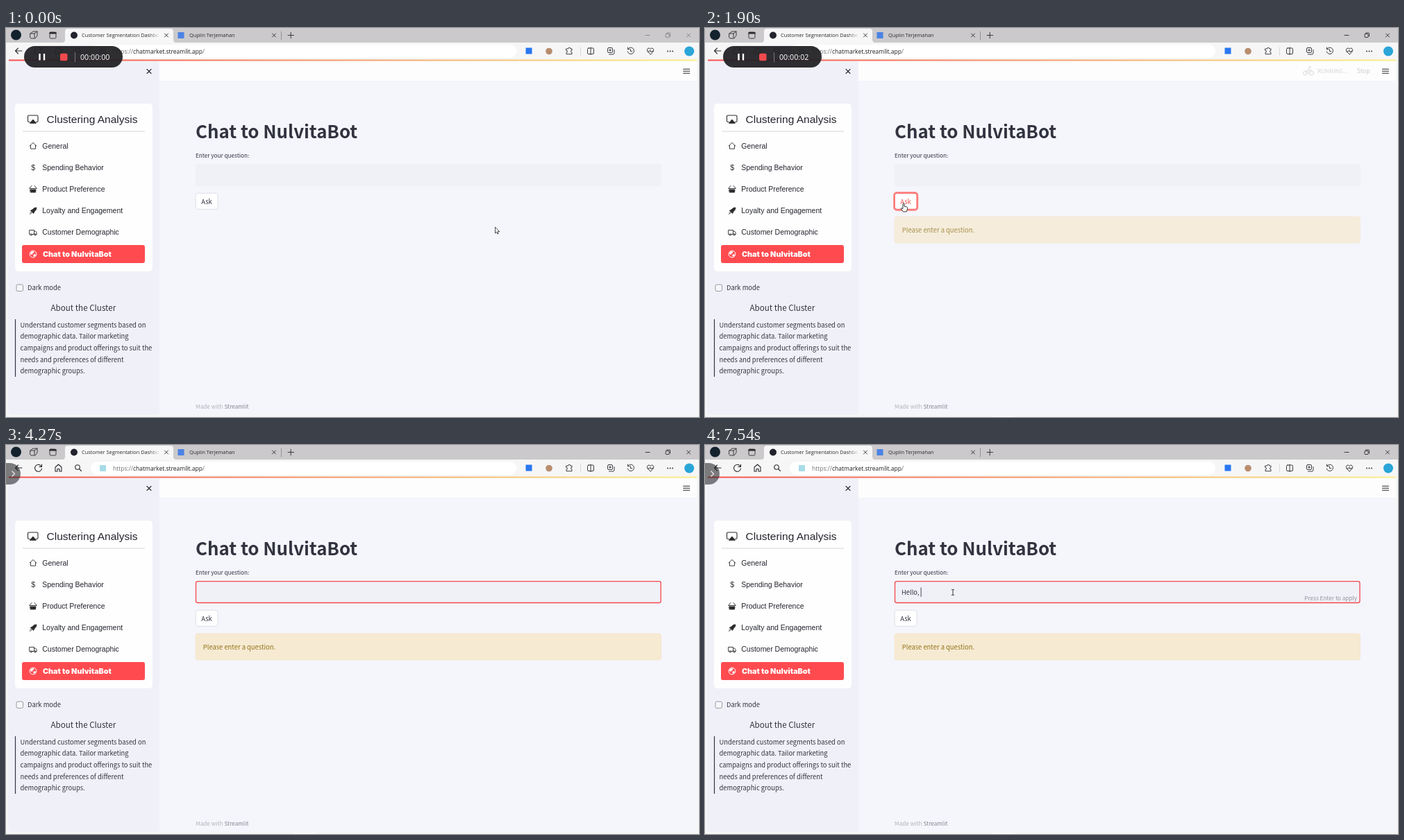
An HTML page for the animation above (8000 ms loop, 998 px wide and 561 px high).

```html
<!DOCTYPE html>
<html lang="en">
<head>
<meta charset="utf-8">
<title>Customer Segmentation Dashboard</title>
<style>
  html, body { margin: 0; width: 100%; height: 100%; overflow: hidden; background: #f3f3f5; }
  svg { display: block; width: 100vw; height: 100vh; }
  text { white-space: pre; }
  .src { font-family: "Noto Sans CJK JP", "Noto Sans CJK SC", "Noto Sans CJK KR", "Noto Sans CJK", sans-serif; font-size: 9.39px; fill: #31333f; }
  .sm { font-size: 8.2px; }
  .nav { font: 10.48px "Liberation Sans", Arial, sans-serif; fill: #24262e; }
  .ui { font: 7.35px "Open Sans", "Noto Sans", sans-serif; fill: #2a2a2c; }
  .line { fill: none; stroke: #2b2b2e; stroke-width: 1.1; stroke-linecap: round; stroke-linejoin: round; }
  .thin { stroke-width: .9; }
</style>
</head>
<body>
<svg viewBox="0 0 998 561" preserveAspectRatio="none">
  <defs>
    <linearGradient id="bar"><stop stop-color="#f5504f"/><stop offset="1" stop-color="#fbf28a"/></linearGradient>
    <linearGradient id="fade" gradientUnits="userSpaceOnUse" x1="206" x2="222" y1="0" y2="0">
      <stop stop-color="#f8f7f8" stop-opacity="0"/><stop offset="1" stop-color="#f8f7f8"/>
    </linearGradient>
  </defs>

  <!-- browser tabs -->
  <rect width="998" height="561" fill="#f6f6f7"/>
  <rect width="998" height="21" fill="#cbc9cb"/>
  <path d="M81 21q4 0 4-4V5q0-4 4-4H237q4 0 4 4V17q0 4 4 4Z" fill="#f8f7f8"/>
  <circle cx="14.500" cy="10" r="7.500" fill="#14222e"/>
  <g class="line thin">
    <path d="M35 8l4-3h6v6l-3 4h-6l-1-1ZM35 8h6v6M41 8l4-3"/>
    <rect x="63" y="6" width="9" height="9" rx="1.500"/>
    <path d="M63.500 7.200h8" stroke-width="2.400"/>
    <path d="M228.500 8l5 5m0-5l-5 5M383.500 8l5 5m0-5l-5 5M406 10.500h8.500M410.200 6.200v8.500"/>
    <path d="M396.500 5v12" stroke="#8f8d90"/>
  </g>
  <circle cx="98" cy="10.500" r="5" fill="#22232c"/>
  <rect x="247.500" y="6" width="9" height="9" fill="#4b83e6"/>
  <text class="ui" x="109" y="13">Customer Segmentation Dashbo</text>
  <rect x="206" y="3" width="16" height="15" fill="url(#fade)"/>
  <text class="ui" x="264" y="13">Quplin Terjemahan</text>
  <g id="winButtons" class="line thin">
    <path d="M921 10.500h6M980.500 8l5 5m0-5l-5 5"/>
    <rect x="950" y="8.500" width="5" height="5" rx="1"/><path d="M951.500 7h4q1 0 1 1v4"/>
  </g>

  <!-- toolbar -->
  <rect x="122" y="24" width="613" height="19" rx="9.500" fill="#fff"/>
  <g class="line">
    <path d="M23 33H13.500m4-4l-4 4 4 4M51 31a5 5 0 1 0 .5 3M51.500 28v3.500H48"/>
    <path d="M71 32l4.500-4 4.500 4v6h-3v-3.500h-3V38h-3Z"/>
    <circle cx="103" cy="32" r="3.300"/><path d="M105.500 34.500l3 3"/>
  </g>
  <rect x="135" y="29" width="9" height="9" rx="1" fill="#a9dbe8"/>
  <text class="ui" x="154" y="36.500" style="font-size:8.5px;fill:#737378">https://<tspan fill="#1d1d20">chatmarket.streamlit.app</tspan>/</text>
  <rect x="748.500" y="28.500" width="9" height="9" fill="#2877f0"/>
  <circle cx="782" cy="33.500" r="4.800" fill="#b98d6c"/>
  <g class="line thin">
    <path d="M807 30h2.500a1.700 1.700 0 0 1 3.400 0h2.100v2.300a1.500 1.500 0 0 0 0 3v2.400h-8v-2.400a1.500 1.500 0 0 0 0-3Z"/>
    <path d="M827.500 28v11" stroke="#d5d5d8"/>
    <rect x="837.500" y="29" width="9" height="8.500" rx="1.500"/><path d="M842 28v10.500"/>
    <rect x="866.500" y="28.500" width="7" height="7" rx="1.500"/>
    <path d="M868.500 38h5.500q2 0 2-2v-4.500M870 30.500v3M868.500 32h3"/>
    <path d="M896 30a4.700 4.700 0 1 1-.8 4M895.500 28v2.800h2.800M899.500 31v2.700h2.300"/>
    <path d="M928 38l-4-4.200q-2-3 .8-4.600 2-.7 3.200 1.300 1.200-2 3.200-1.300 2.800 1.600.8 4.600ZM924 34h2.500l1.200-2 1.500 3 1-1.500h2"/>
  </g>
  <g fill="#2b2b2e"><circle cx="953" cy="33.500" r=".9"/><circle cx="956.500" cy="33.500" r=".9"/><circle cx="960" cy="33.500" r=".9"/></g>
  <circle cx="984" cy="33.500" r="7" fill="#2aa5d8"/>

  <!-- page -->
  <path d="M3 46H995V553q0 5-5 5H8q-5 0-5-5Z" fill="#f5f5fc"/>
  <path d="M3 48H221V558H8q-5 0-5-5Z" fill="#f0f1f8"/>
  <rect x="221" y="48" width="774" height="28" fill="#fdfdfd"/>
  <rect x="4" y="45.500" width="991" height="2" fill="url(#bar)"/>
  <path class="line" d="M203 59.500l6 6m0-6l-6 6M975.500 59.200h9M975.500 62.200h9M975.500 65.200h9"/>
  <rect id="taskbar" x="415" y="559.500" width="31" height="1.500" fill="#fff"/>

  <!-- sidebar card -->
  <rect x="13" y="109" width="198" height="242" rx="5" fill="#fefefe"/>
  <g class="line"><path d="M34 135.500h-1q-1.500 0-1.500-1.500v-6.500q0-1.500 1.500-1.500h11.500q1.500 0 1.500 1.500v6.500q0 1.500-1.500 1.500h-1"/><path d="M34.500 137.300l4.400-5 4.400 5Z" fill="#2b2b2e"/></g>
  <text class="nav" x="58.500" y="137" style="font-size:15.5px">Clustering Analysis</text>
  <path d="M24 149h176" stroke="#d6d7dc"/>
  <g id="nav"></g>
  <g class="line thin">
    <path d="M34 170.200l5-4.700 5 4.700M35.500 169.500v4.700h7v-4.700"/>
    <path d="M34 231l3-3.500M44 231l-3-3.500"/><path d="M34 231.500h10M35 233h8l-.5 4h-7Z" fill="#2b2b2e"/>
    <path d="M35.500 263.500l3-2q2-3 5.500-2.500 0 3.500-2.800 5.500l-1.700 3-1.500-2-2.500-2ZM35 266.500l1.500-1.500M34.500 268.500l3-2.500" fill="#2b2b2e"/>
    <path d="M34 291.500h6.500v6h-6.500ZM40.500 293.200h2.300l1.400 2v2.300h-3.700"/>
    <circle cx="36.200" cy="298" r="1.200" fill="#fff"/><circle cx="42" cy="298" r="1.200" fill="#fff"/>
  </g>
  <rect x="23" y="313" width="177" height="26" rx="3" fill="#ff4b4f"/>
  <circle cx="39" cy="326" r="4.900" fill="none" stroke="#fff"/>
  <path d="M36 322.500l3.500-.5 1 2-2.500 1.300-.5 2-2.500-1.800ZM39 327l3-1 1 1.500-2.500 2.800Z" fill="#fff"/>
  <text x="53" y="330" style="font:900 10.8px Inter,sans-serif;fill:#fff">Chat to NulvitaBot</text>

  <rect x="15" y="370" width="9.500" height="9.500" rx="2" fill="#f7f7fa" stroke="#8e9098" stroke-width=".9"/>
  <text class="src" x="31" y="378.300">Dark mode</text>
  <text class="src" x="64.500" y="408" style="font-size:11.6px">About the Cluster</text>
  <path d="M13.500 420v83" stroke="#31333f" stroke-width="1.200"/>
  <g id="about"></g>

  <!-- main column -->
  <text class="src" x="273" y="158.800" style="font-size:25.8px;font-weight:700">Chat to NulvitaBot</text>
  <text class="src sm" x="273" y="187">Enter your question:</text>
  <rect x="273" y="196" width="671" height="32" rx="3" fill="#f0f1f7"/>
  <rect id="focus" x="273.500" y="196.700" width="669.500" height="30.800" rx="2.500" fill="none" stroke="#f4484b" stroke-width="1.300"/>
  <text id="typed" class="src" x="283" y="215.700"></text>
  <path id="caret" d="M.5 205.500v13.500" stroke="#31333f" stroke-width=".9"/>
  <text id="hint" class="src sm" x="939" y="223.800" text-anchor="end" style="fill:#94959d">Press Enter to apply</text>

  <rect id="ring" x="272.200" y="237.200" width="34" height="25.600" rx="4" fill="none" stroke="#ff8583" stroke-width="2"/>
  <rect id="ask" x="273.200" y="238.300" width="31.800" height="23" rx="3" fill="#fff"/>
  <text id="askText" class="src" x="289" y="253.600" text-anchor="middle">Ask</text>

  <g id="warning">
    <rect x="273" y="272" width="670.500" height="38" rx="3" fill="#f6ead3" stroke="#f3e6cb" stroke-width=".8"/>
    <text class="src" x="283.800" y="294.600" style="fill:#927317">Please enter a question.</text>
  </g>
  <g id="running">
    <g class="line thin" style="stroke:#77787f"><circle cx="864.500" cy="65" r="3"/><circle cx="873.500" cy="65" r="3"/><path d="M865 65l2.500-4.500 2.500 2v3.500M867.500 60.500l2-2 2 2.500h2"/><circle cx="871" cy="56.500" r="1"/></g>
    <text class="src" x="882" y="65.300" style="font-size:8.2px;fill:#77787f">RUNNING...</text>
    <text class="src" x="939" y="65.300" style="font-size:8.6px;fill:#55565e">Stop</text>
  </g>
  <text class="src sm" x="273" y="549" style="fill:#b2b2b8">Made with <tspan style="fill:#85868e;font-weight:500">Streamlit</tspan></text>

  <!-- screen recorder -->
  <g id="recorder">
    <rect id="pill" x="26" y="26" width="142" height="31" rx="15.500" fill="#242326"/>
    <g id="controls">
      <path d="M48.500 37v9.500M55 37v9.500" stroke="#fff" stroke-width="2.400"/>
      <rect x="78" y="36.800" width="10.500" height="10.500" rx="2" fill="#f0494e"/>
      <path d="M99.500 35v14" stroke="#77777b"/>
      <text id="timer" class="ui" x="107" y="46" style="font-size:10.7px;fill:#fff"></text>
    </g>
  </g>
  <path id="chevron" d="M8.500 37.500l4 4-4 4" fill="none" stroke="#ededee" stroke-width="1.200"/>

  <!-- pointers, hot spot at the origin -->
  <path id="arrow" d="M0 0V9l2-1.800L3.300 10l1.300-.6L3.400 6.700H6.200Z" fill="#fff" stroke="#222" stroke-width=".8"/>
  <path id="hand" d="M-1 1q0-1.200 1-1.200T1 1v3.200l3.600.8q1.200.3 1 1.600L5 9.500 4 12H-.5L-3.500 8q-.6-1.200.6-1.300L-1 7.600Z" fill="#fff" stroke="#222" stroke-width=".9"/>
  <path id="beam" d="M-2-4H-.6L0-3.500.6-4H2M0-3.500v7M-2 4H-.6L0 3.500.6 4H2" fill="none" stroke="#222" stroke-width=".9"/>
</svg>
<script>
const LOOP = 8000;
const $ = id => document.getElementById(id);
const set = (id, attrs) => { for (const k in attrs) $(id).setAttribute(k, attrs[k]); };
const show = (id, o) => set(id, { opacity: +o });
const ramp = (t, a, b) => Math.min(1, Math.max(0, (t - a) / (b - a)));
const ease = x => x * x * (3 - 2 * x);
const mix = (a, b, k) => a + (b - a) * k;

function addLines(id, cls, x, y, step, lines) {
  lines.forEach((line, i) => {
    const el = document.createElementNS("http://www.w3.org/2000/svg", "text");
    el.setAttribute("class", cls);
    el.setAttribute("x", x);
    el.setAttribute("y", y + i * step);
    el.textContent = line;
    $(id).append(el);
  });
}
addLines("nav", "nav", 52.3, 173.6, 31.15,
  ["General", "Spending Behavior", "Product Preference", "Loyalty and Engagement", "Customer Demographic"]);
addLines("nav", "nav", 36.2, 204.8, 0, ["$"]);
addLines("about", "src", 20.5, 431.7, 16.65, [
  "Understand customer segments based on",
  "demographic data. Tailor marketing",
  "campaigns and product offerings to suit the",
  "needs and preferences of different",
  "demographic groups."]);

// pointer moves: start, end, target x, target y
const HOME = [704.5, 287];
const MOVES = [
  [40, 840, 286, 253],
  [2240, 2920, 428.5, 204],
  [3470, 4100, 431, 580],
  [4270, 5070, 357, 212.5]
];
const KEYS = [6470, 6640, 6800, 6970, 7140, 7300, 7540];

function pointer(t) {
  let [x, y] = HOME;
  for (const [a, b, tx, ty] of MOVES) {
    const k = ease(ramp(t, a, b));
    x = mix(x, tx, k);
    y = mix(y, ty, k);
  }
  return [x, y];
}

function draw(t) {
  // pointer
  const [x, y] = pointer(t);
  const onAsk = x > 273 && x < 305 && y > 238 && y < 262;
  const inInput = x > 273 && x < 943 && y > 196 && y < 228;
  const kind = onAsk ? "hand" : inInput ? "beam" : "arrow";
  for (const id of ["arrow", "hand", "beam"]) show(id, id === kind);
  set(kind, { transform: `translate(${x} ${y})` });

  // window and button
  const active = t >= 1400;
  show("winButtons", active ? 1 : .45);
  show("taskbar", active);
  const pressed = t >= 1400 && t < 2940;
  const red = onAsk || pressed;
  set("ask", { stroke: red ? "#f4504f" : "#d9dae1", "stroke-width": red ? 1 : .8 });
  $("askText").style.fill = red ? "#f4504f" : "#31333f";
  show("ring", pressed ? ramp(t, 1400, 1550) : 0);

  // app response
  show("running", .4 * ramp(t, 1480, 1700) * (1 - ramp(t, 1850, 2040)));
  show("warning", t < 1720 ? 0 : mix(.5, 1, ramp(t, 1720, 2040)));

  // input
  const focus = ramp(t, 2930, 3150) - ramp(t, 5270, 5430) + ramp(t, 5450, 5610);
  show("focus", focus);
  const typed = "Hello, ".slice(0, KEYS.filter(k => t >= k).length);
  $("typed").textContent = typed;
  const caretOn = (t >= 2940 && t < 3470) || (t >= 5510 && t < 6040) || t >= KEYS[0];
  show("caret", caretOn);
  const w = typed ? $("typed").getComputedTextLength() : 0;
  set("caret", { transform: `translate(${283 + w} 0)` });
  show("hint", t < KEYS[0] ? 0 : mix(.35, 1, ramp(t, KEYS[0], 6800)));

  // recorder slides into the left edge
  const k = ease(ramp(t, 2740, 3166));
  $("timer").textContent = "00:00:0" + Math.floor((t + 100) / 1000);
  set("recorder", { transform: `translate(${-147 * k} 0)` });
  set("controls", { transform: `translate(${-10 * k} 0)` });
  show("pill", mix(.95, .58, k));
  show("controls", 1 - ramp(k, 0, .95));
  show("chevron", ramp(k, .85, 1));
}

let start;
function tick(now) {
  start ??= now;
  draw((now - start) % LOOP);
  requestAnimationFrame(tick);
}
draw(0);
requestAnimationFrame(tick);
</script>
</body>
</html>
```
